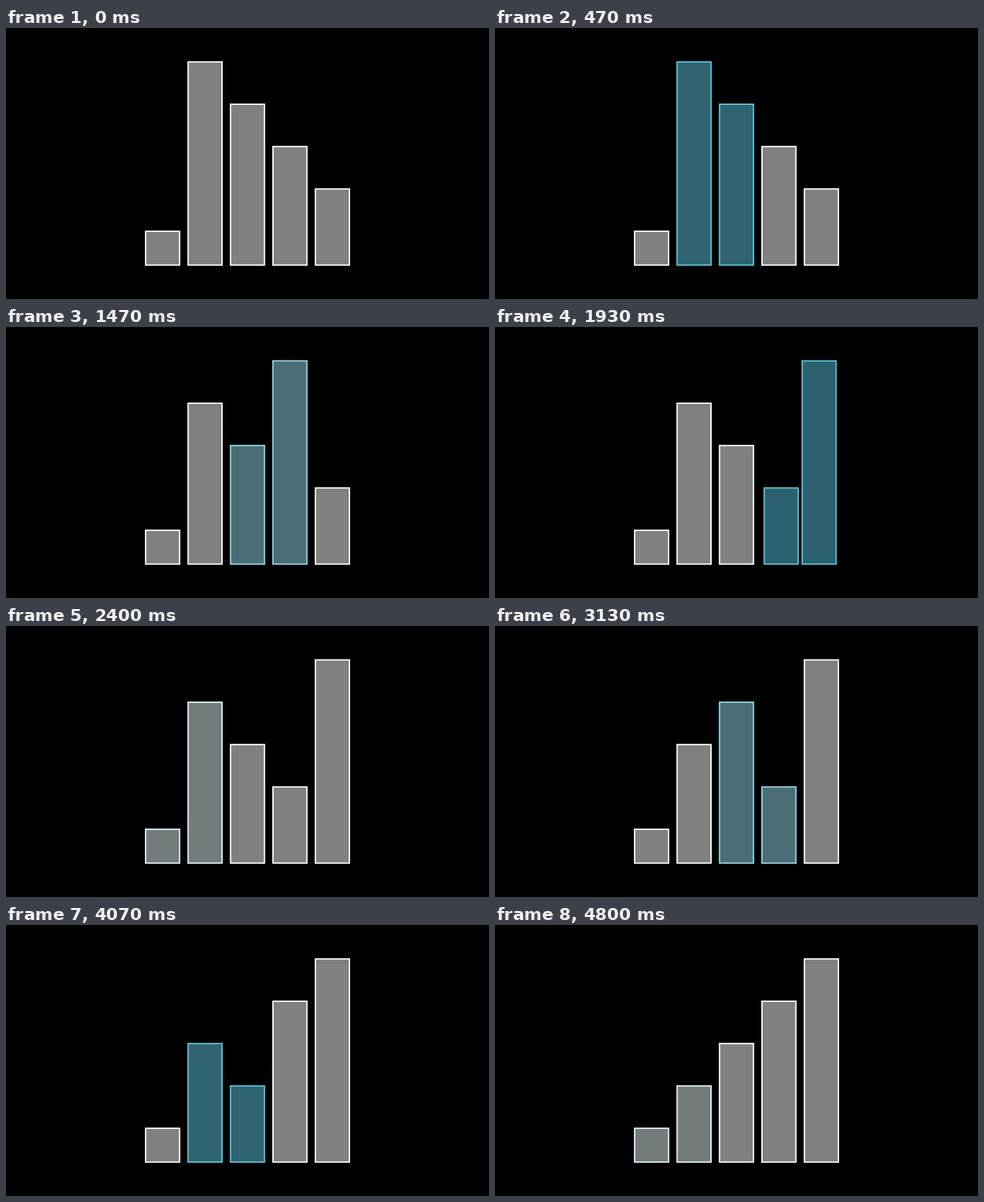
These frames come from a looping animation (720x405 px, 4870 ms). An HTML page with a canvas:

```html
<!DOCTYPE html>
<html lang="en">
<head>
<meta charset="utf-8">
<title>Bubble sort</title>
<style>
  html, body { margin: 0; width: 100%; height: 100%; overflow: hidden; background: #000; }
  canvas { display: block; }
</style>
</head>
<body>
<canvas id="stage" width="720" height="405"></canvas>
<script>
const ctx = document.getElementById('stage').getContext('2d');
const LOOP = 4870, FRAME = 1000 / 15, START = 50, BEAT = 150;
const UNIT = 405 / 8, PITCH = 1.25 * UNIT;
const LEFT = 360 - 3 * UNIT, BASE = 202.5 + 3 * UNIT;
const WHITE = [255, 255, 255], BLUE = [88, 196, 221];

const sigmoid = x => 1 / (1 + Math.exp(-x));
function smooth(x) {
  const edge = sigmoid(-5);
  const y = (sigmoid(10 * (x - 0.5)) - edge) / (1 - 2 * edge);
  return Math.min(1, Math.max(0, y));
}

// Each comparison lights a pair for one beat, swaps it over two if needed, then fades it for one.
function bubbleSort(values) {
  const order = [...values], steps = [];
  let start = START;
  for (let end = order.length - 1; end > 0; end--) {
    for (let i = 0; i < end; i++) {
      const swap = order[i] > order[i + 1];
      const length = (swap ? 4 : 2) * BEAT;
      steps.push({ i, swap, start, length, order: [...order] });
      if (swap) [order[i], order[i + 1]] = [order[i + 1], order[i]];
      start += length;
    }
  }
  return steps;
}
const steps = bubbleSort([1, 5, 4, 3, 2]);

function drawBar(value, slot, glow) {
  const color = WHITE.map((c, n) => Math.round(c + (BLUE[n] - c) * glow));
  const height = (1 + 1.25 * (value - 1)) * UNIT;
  const box = [LEFT + slot * PITCH, BASE - height, UNIT, height];
  ctx.fillStyle = `rgba(${color}, 0.5)`;
  ctx.fillRect(...box);
  ctx.strokeStyle = `rgb(${color})`;
  ctx.lineWidth = 2;
  ctx.strokeRect(...box);
}

function draw(time) {
  const step = steps.findLast(s => s.start <= time) || steps[0];
  const local = time - step.start;
  const glow = smooth(Math.min(local, step.length - local) / BEAT);
  const shift = step.swap ? smooth((local - BEAT) / (2 * BEAT)) : 0;
  ctx.clearRect(0, 0, 720, 405);
  step.order.forEach((value, slot) => {
    if (slot === step.i) drawBar(value, slot + shift, glow);
    else if (slot === step.i + 1) drawBar(value, slot - shift, glow);
    else drawBar(value, slot, 0);
  });
}

function tick() {
  const frame = Math.min(72, Math.floor((performance.now() % LOOP + 3.4) / FRAME));
  draw(frame * FRAME);
  requestAnimationFrame(tick);
}
tick();
</script>
</body>
</html>
```
